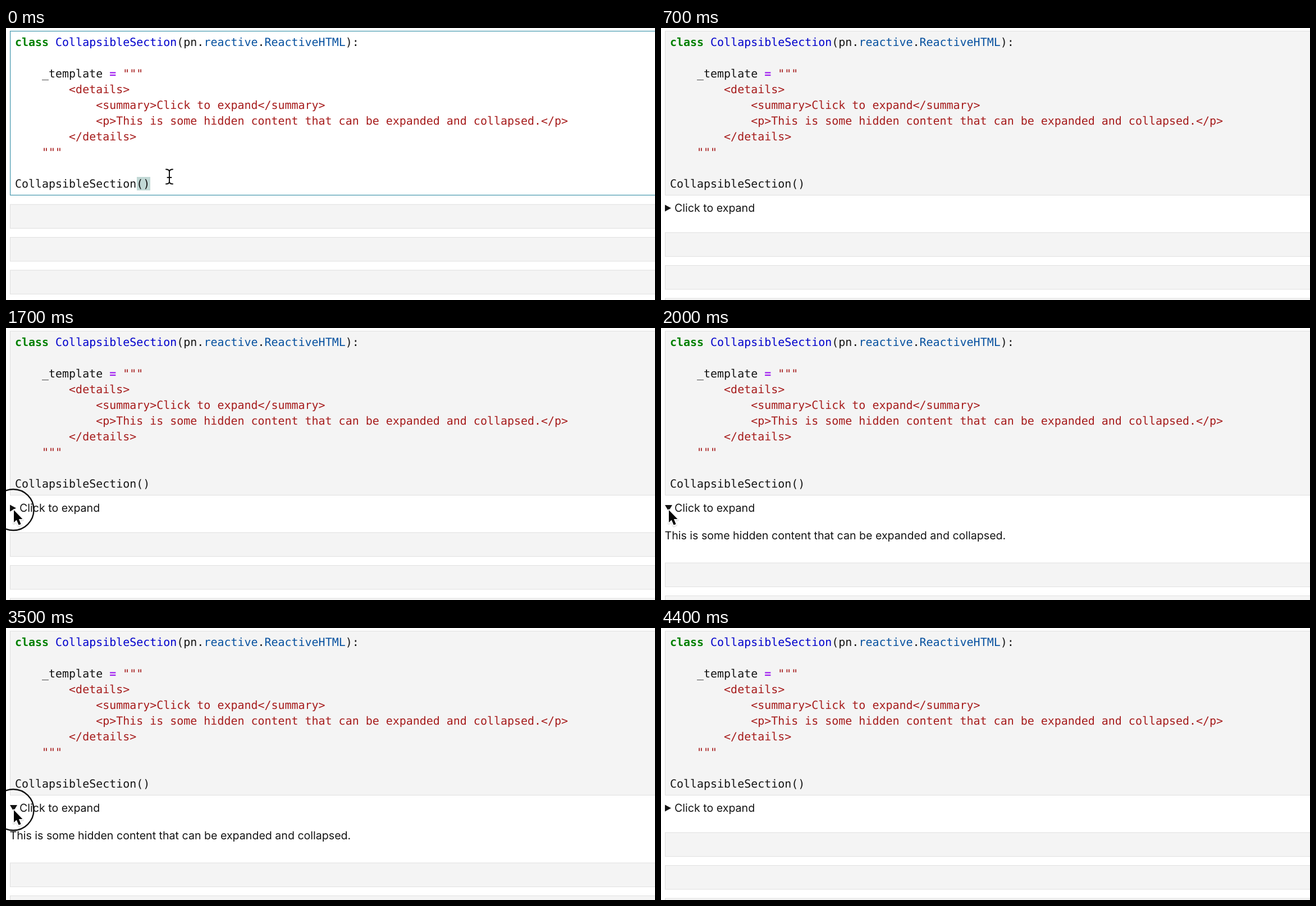
An HTML page that plays this animation: 1156x484 px, repeating every 4.5 s.

```html
<!DOCTYPE html>
<html lang="en">
<head>
<meta charset="utf-8">
<title>Collapsible section</title>
<style>
  html, body { margin: 0; width: 100%; height: 100%; overflow: hidden; background: #fff; }
  svg { display: block; width: 1156px; height: 484px; }
  text { white-space: pre; fill: #141414; text-rendering: geometricPrecision; }
  #code text { font: 19.97px "DejaVu Sans Mono", monospace; }
  .label { font: 19.6px Inter, "Open Sans", sans-serif; }
  #code .kw { fill: #008000; font-weight: bold; }
  .def { fill: #0000cc; }
  .prop { fill: #05509f; }
  .str { fill: #a61b1b; }
  #code .op { fill: #a020f0; font-weight: bold; }
  .bar { fill: #f4f4f4; stroke: #e0e0e0; }
</style>
</head>
<body>
<svg id="stage" viewBox="0 0 1156 484">
  <rect id="cell" x="7.5" y="5.5" width="1170" height="292"/>
  <g id="editing">
    <rect x="8.5" y="6.5" width="1170" height="290" fill="none" stroke="#dff1f4"/>
    <rect x="233" y="265" width="24" height="24" fill="#c1d8d5"/>
  </g>
  <g id="code"></g>
  <rect class="bar" width="1170" height="42.5" x="7.5"/>
  <rect class="bar" width="1170" height="42.5" x="7.5"/>
  <rect class="bar" width="1170" height="42.5" x="7.5"/>
  <g id="output">
    <path id="marker" fill="#141414"/>
    <text class="label" x="24" y="327">Click to expand</text>
    <text class="label" id="details" x="6.5" y="375.5">This is some hidden content that can be expanded and collapsed.</text>
  </g>
  <path id="collapser" d="M-2 306.5H6.5V347.5H-2Z" fill="#f4f4f4" stroke="#e0e0e0"/>
  <g id="beam" fill="none" stroke-linecap="round">
    <path d="M285 251.5Q291 251.5 291 256Q291 251.5 297 251.5M291 256V273M285 277.5Q291 277.5 291 273Q291 277.5 297 277.5M287.5 266H294.5" stroke="#111" stroke-width="2"/>
  </g>
  <g id="zoom" fill="none">
    <path d="M12 332L20 340" stroke="#fff" stroke-width="7"/>
    <circle cx="4.5" cy="324.5" r="10.5" fill="#fff" stroke="#111" stroke-width="2.5"/>
    <path d="M12.5 332.5L20 340" stroke="#111" stroke-width="4.5"/>
    <path d="M-1 324.5H10.5" stroke="#111" stroke-width="3"/>
  </g>
  <circle id="ring" cx="13" cy="323.5" r="36.5" fill="none" stroke="#111" stroke-width="2.4"/>
  <g id="arrow" stroke-linejoin="round">
    <path d="M0 0V22L4.8 17.6L8.6 26.6L12.6 25L8.9 16H15.5Z" transform="translate(0 1.5)" fill="none" stroke="#000" stroke-opacity=".1" stroke-width="5"/>
    <path d="M0 0V22L4.8 17.6L8.6 26.6L12.6 25L8.9 16H15.5Z" fill="#050505" stroke="#fff" stroke-width="3.5" paint-order="stroke"/>
  </g>
</svg>
<script>
const LOOP = 4500, STEP = 100;
const RUN = 100, OPEN = 1800, CLOSE = 3600, PRESS = 200;
const $ = id => document.getElementById(id);
const bars = document.querySelectorAll('.bar');

// Each line is a list of [text, class] pieces.
const lines = [
  [['class', 'kw'], [' '], ['CollapsibleSection', 'def'], ['(pn.'], ['reactive', 'prop'], ['.'], ['ReactiveHTML', 'prop'], ['):']],
  [],
  [['    _template '], ['=', 'op'], [' '], ['"""', 'str']],
  [['        <details>', 'str']],
  [['            <summary>Click to expand</summary>', 'str']],
  [['            <p>This is some hidden content that can be expanded and collapsed.</p>', 'str']],
  [['        </details>', 'str']],
  [['    """', 'str']],
  [],
  [['CollapsibleSection()']]
];

function add(parent, tag, attrs, text = '') {
  const el = document.createElementNS('http://www.w3.org/2000/svg', tag);
  for (const key in attrs) el.setAttribute(key, attrs[key]);
  el.textContent = text;
  return parent.appendChild(el);
}

lines.forEach((pieces, i) => {
  const row = add($('code'), 'text', { x: 16, y: 32 + 28 * i });
  for (const [text, cls = ''] of pieces) add(row, 'tspan', { class: cls }, text);
});

// Pointer tip at given times; it rests between the two clicks.
const path = [[1000, 1, 346], [1100, 5, 324], [1200, 6, 324], [1400, 14, 324], [3800, 14, 324], [4000, 36, 356], [4100, 70, 402]];

function pointerAt(t) {
  const i = Math.max(1, path.findIndex(p => p[0] >= t));
  const [t0, x0, y0] = path[i - 1], [t1, x1, y1] = path[i];
  const k = (t - t0) / (t1 - t0);
  return [x0 + (x1 - x0) * k, y0 + (y1 - y0) * k];
}

function show(id, on) {
  $(id).setAttribute('visibility', on ? 'visible' : 'hidden');
}

function render(time) {
  const t = Math.floor((time % LOOP) / STEP) * STEP;
  const ran = t >= RUN;
  const open = t >= OPEN && t < CLOSE;
  const zooming = t >= 1100 && t < 1300;
  const pressed = [OPEN, CLOSE].some(end => t >= end - PRESS && t < end);
  const pointing = t >= 1000 && t <= 4100 && !zooming;

  $('cell').setAttribute('fill', ran ? '#f4f4f4' : '#fff');
  $('cell').setAttribute('stroke', ran ? '#e0e0e0' : '#3e91a8');
  show('editing', !ran);
  show('beam', !ran);
  show('output', ran);
  show('details', open);
  $('marker').setAttribute('d', open ? 'M7 315H20L13.5 326Z' : 'M7 314.5L18 320.5L7 326.5Z');

  const top = !ran ? 314 : open ? 418 : 364;
  bars.forEach((bar, i) => bar.setAttribute('y', top + 58.5 * i));

  show('collapser', zooming);
  show('zoom', zooming);
  show('ring', pressed);
  show('arrow', pointing);
  if (pointing) $('arrow').setAttribute('transform', `translate(${pointerAt(t)})`);
}

const start = performance.now();
function tick() {
  render(performance.now() - start);
  requestAnimationFrame(tick);
}
tick();
</script>
</body>
</html>
```
